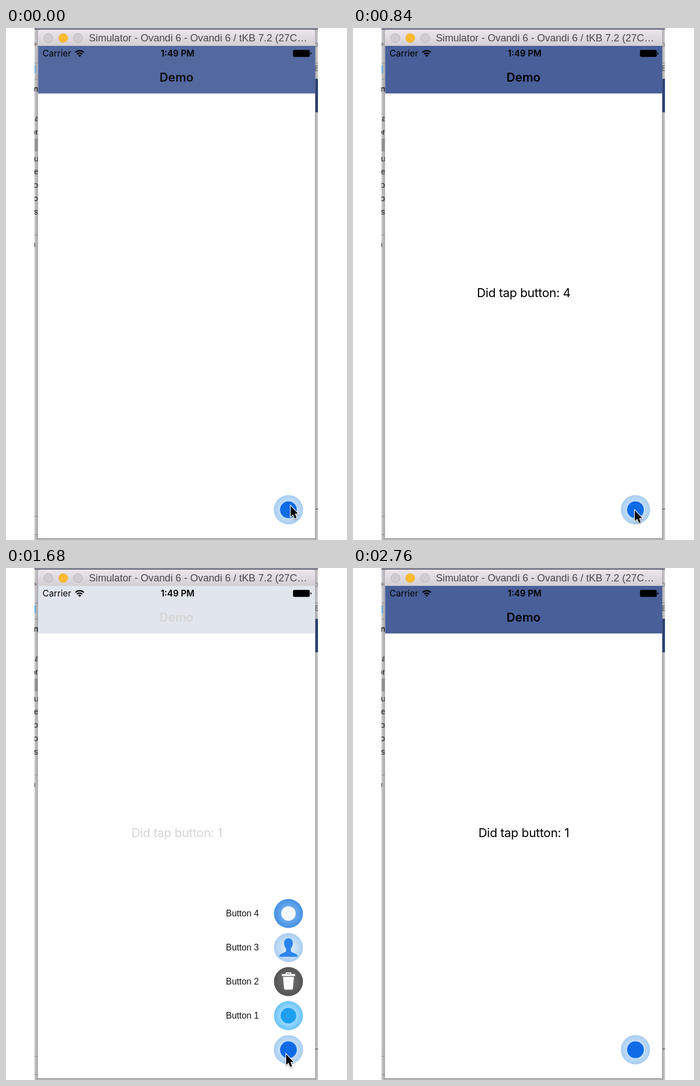
These frames come from a looping animation (611 px wide and 917 px high, 2880 ms). An HTML page:

```html
<!DOCTYPE html>
<html lang="en">
<head>
<meta charset="utf-8">
<title>Floating button demo</title>
<style>
html, body { margin: 0; width: 100%; height: 100%; overflow: hidden; background: #fff; }
svg { display: block; width: 611px; height: 917px; }
.ui { font-family: Inter, "Open Sans", sans-serif; }
.sys { font-family: "Liberation Sans", Arial, sans-serif; }
</style>
</head>
<body>
<svg viewBox="0 0 611 917">
  <defs>
    <linearGradient id="title" x1="0" y1="0" x2="0" y2="1">
      <stop offset="0" stop-color="#ebe6ec"/><stop offset="1" stop-color="#d2cfd3"/>
    </linearGradient>
    <linearGradient id="left">
      <stop offset="0" stop-opacity=".02"/><stop offset="1" stop-opacity=".2"/>
    </linearGradient>
    <linearGradient id="right">
      <stop offset="0" stop-opacity=".2"/><stop offset="1" stop-opacity=".02"/>
    </linearGradient>
    <radialGradient id="pale"><stop offset=".35" stop-color="#d3e7fb"/><stop offset="1" stop-color="#a8cdf1"/></radialGradient>
    <radialGradient id="sky"><stop offset=".3" stop-color="#b2e3fe"/><stop offset="1" stop-color="#68c3f9"/></radialGradient>
    <radialGradient id="dark"><stop offset=".3" stop-color="#6c6c6c"/><stop offset="1" stop-color="#545454"/></radialGradient>
    <radialGradient id="blue"><stop offset=".3" stop-color="#76b3f2"/><stop offset="1" stop-color="#4690e2"/></radialGradient>
    <clipPath id="crop"><rect x="51" width="508" height="917"/></clipPath>
  </defs>

  <g clip-path="url(#crop)">
    <rect x="51" width="508" height="917" fill="#d0d0d0"/>
    <rect x="51" width="508" height="62" fill="#d8d5da"/>
    <rect x="51" y="1" width="508" height="1.500" fill="#2a2d45"/>
    <path d="M51 62.5h6M51 91.5h6M51 370.5h6M51 874.5h6M51 907.5h6M554 62.5h5" stroke="#9b9b9b"/>
    <path d="M51 25l5 4-5 4z" fill="#9a989c"/>
    <rect x="51" y="67" width="3" height="14" fill="#7fb9e6"/>
    <rect x="51" y="198" width="6" height="23" fill="#a4a4a4"/>
    <rect x="554" y="91" width="5" height="60" fill="#304880"/>
    <path d="M554 861.5h5" stroke="#333"/>
    <g id="scraps" class="sys" font-size="15"></g>
    <rect x="51" y="3" width="6" height="914" fill="url(#left)"/>
    <rect x="554" y="3" width="5" height="914" fill="url(#right)"/>

    <path d="M57 917V9q0-6 6-6H548q6 0 6 6V917z" fill="#fff" stroke="#999" stroke-opacity=".6"/>
    <path d="M57 32V9q0-6 6-6H548q6 0 6 6V32z" fill="url(#title)"/>
    <g>
      <circle cx="76" cy="18" r="8" fill="#d0ccd1" stroke="#b9b5ba"/>
      <circle cx="102.500" cy="18" r="8" fill="#fdba2f" stroke="#f3b237"/>
      <circle cx="129" cy="18" r="8" fill="#d0ccd1" stroke="#b9b5ba"/>
    </g>
    <text class="sys" x="148.500" y="24" font-size="18.150" fill="#4a484b">Simulator - Ovandi 6 - Ovandi 6 / tKB 7.2 (27C…</text>

    <rect x="57.500" y="32" width="496.500" height="85" fill="#485f99"/>
    <path d="M57.500 117.500H554" stroke="#c4c8d2" stroke-opacity=".7"/>
    <g class="ui" text-anchor="middle">
      <text x="305.500" y="95.700" font-size="21.600" font-weight="600">Demo</text>
      <text id="message" x="306" y="482" font-size="21.800" letter-spacing="-.25"></text>
    </g>
    <rect id="overlay" x="57.500" y="32" width="496.500" height="882" fill="#fff"/>

    <g class="ui" font-size="15.700">
      <text x="65.500" y="51.300">Carrier</text>
      <text x="307.500" y="51.300" text-anchor="middle" font-weight="600">1:49 PM</text>
    </g>
    <g fill="none" stroke="#000" stroke-width="2.100">
      <path d="M124.500 43.800a10.500 10.500 0 0 1 15 0M127.300 46.800a6.600 6.600 0 0 1 9.400 0"/>
      <path d="M132 51.800l-2.700-2.800a3.800 3.800 0 0 1 5.400 0z" fill="#000" stroke="none"/>
    </g>
    <rect x="514.500" y="39.500" width="29.500" height="12" rx="2" stroke="#000" stroke-opacity=".5"/>
    <path d="M545.500 43.500q2 .5 2 2t-2 2z"/>
    <path d="M57 915h497" stroke="#8f8f8f" stroke-width="2"/>

    <g id="items"></g>
    <g transform="translate(506.100 862.800)">
      <circle r="25.900" fill="url(#pale)" stroke="#9fc6ec" stroke-width=".6"/>
      <circle r="15" fill="#0f6be6"/>
    </g>
    <path id="cursor" d="M0 0V19L4.300 15L7.300 22.400L10.600 21L7.600 13.800H13.200Z"
      stroke="#fff" stroke-width="2.400" paint-order="stroke" style="filter:drop-shadow(0 1px 1px #0006)"/>
  </g>
</svg>

<script>
const $ = id => document.getElementById(id);
const STEP = 120;

// Text of the window behind: x, baseline, text, colour, weight
const scraps = [
  [49, 114, 'n', '#111', 700], [43.5, 167, 'La'], [44.5, 191, 'or'], [50, 239, 'u'],
  [50, 262, 'e'], [49, 286, 'o'], [49, 310, 'o'], [50, 334, 's'], [44.5, 392, 'n'],
  [551, 34, 'or', '#8d8b8f'], [553, 77, 'E', '#666']
];
$('scraps').innerHTML = scraps.map(([x, y, s, fill = '#111', weight = 400]) =>
  `<text x="${x}" y="${y}" fill="${fill}" font-weight="${weight}">${s}</text>`).join('');

// Menu items from the bottom up: background and icon
const kinds = [
  ['sky', '<circle r="14" fill="#1f9ff0"/>'],
  ['dark', `<path d="M-4-13v-2.500h8v2.500" fill="none" stroke="#fff" stroke-width="2"/>
    <path d="M-12-13.500h24v3.500h-24zM-9.800-8.500h19.600l-2 21q-.2 2-2 2h-11.600q-1.800 0-2-2z" fill="#fff"/>`],
  ['pale', `<path d="M0-16.500c5 0 8 3.500 7.800 9c0 4.500-1.800 7-3.600 9.500v4.500c2 4 11.800 3 12.300 10H-16.500
    c.5-7 10.300-6 12.300-10v-4.500c-1.800-2.500-3.600-5-3.600-9.500c-.2-5.500 2.800-9 7.800-9z" fill="#2b84ee"/>`],
  ['blue', '<circle r="13" fill="#f4f9ff"/>']
];
$('items').innerHTML = kinds.map(([fill, icon], i) => `
  <g transform="translate(506.1 ${801.8 - 61 * i})"><g>
    <circle r="26" fill="url(#${fill})"/>${icon}
    <circle class="press" r="26" fill="#333" fill-opacity=".5"/>
    <text class="sys" x="-53" y="5.500" text-anchor="end" font-size="15.850" fill="#111">Button ${i + 1}</text>
  </g></g>`).join('');
const items = [...$('items').children].map(g => g.firstElementChild);
const shades = document.querySelectorAll('.press');

// time, value pairs; values between are linear
const menu = [[0, .2], [120, 3], [240, 6.5], [480, 6.5], [600, 3], [720, 0], [840, 0], [960, 3],
  [1080, 6.5], [1200, 6.5], [1320, 3], [1440, 0], [1560, 3], [1680, 6.5], [1800, 6.5], [1920, 3], [2040, 0]];
const pointer = [[0, 510, 856], [120, 510, 854], [360, 505, 650], [480, 503, 621], [600, 503, 622],
  [840, 505, 864], [960, 505, 862], [1080, 504, 818], [1200, 504, 804], [1320, 504, 806],
  [1560, 502, 871], [1920, 502, 871], [2160, 470, 838], [2280, 458, 826], [2400, 458, 827],
  [2520, 290, 760], [2640, 20, 690]];
const clamp = v => Math.max(0, Math.min(1, v));

function at(track, t, k = 1) {
  const n = track.findIndex(p => p[0] > t);
  if (n < 0) return track[track.length - 1][k];
  const a = track[n - 1], b = track[n];
  return a[k] + (b[k] - a[k]) * (t - a[0]) / (b[0] - a[0]);
}

function draw(t) {
  const open = at(menu, t);
  $('overlay').setAttribute('opacity', .835 * clamp(open / 3));
  items.forEach((g, i) => {
    const p = clamp((open - .3 - i) / 2.7);
    g.setAttribute('opacity', p);
    g.setAttribute('transform', `scale(${.4 + .6 * p})`);
  });
  const pressed = t === 480 ? 3 : t === 1200 ? 0 : -1;
  shades.forEach((s, i) => s.setAttribute('opacity', i === pressed ? 1 : 0));
  $('message').textContent = t < 600 ? '' : 'Did tap button: ' + (t < 1320 ? 4 : 1);
  $('cursor').setAttribute('transform', `translate(${at(pointer, t)} ${at(pointer, t, 2)})`);
}

const start = performance.now();
function tick() {
  draw(Math.floor((performance.now() - start) % 2880 / STEP) * STEP);
  requestAnimationFrame(tick);
}
tick();
</script>
</body>
</html>
```
